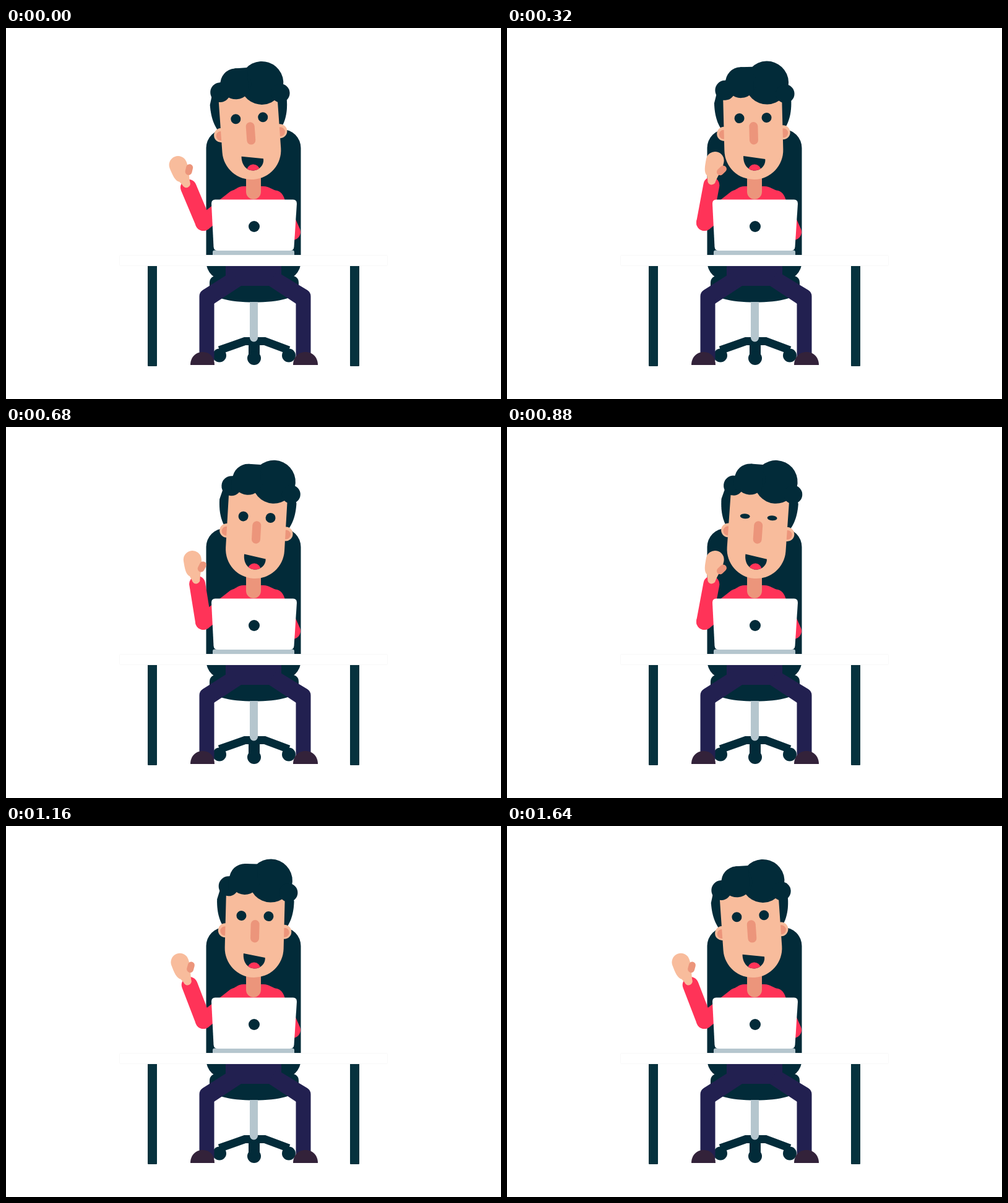
Animation, 800 px wide and 600 px high, one loop 1.68 s. Source, as an HTML page:

```html
<!DOCTYPE html>
<html lang="en">
<head>
<meta charset="utf-8">
<title>Waving at the desk</title>
<style>
  html, body { margin: 0; width: 100%; height: 100%; overflow: hidden; background: #fff; }
  svg { display: block; width: 100%; height: 100%; }
  .dark { fill: #022b39; }
  .leg { fill: #06323e; }
  .skin { fill: #f8bc9c; }
  .shade { fill: #ec957b; }
  .red { fill: #ff3358; }
  .grey { fill: #b5c6ce; }
  .shoe { fill: #33223a; }
  .limb { fill: none; stroke-linecap: round; stroke-linejoin: round; }
  .sleeve { stroke: #ff3358; stroke-width: 26; }
  .pants { stroke: #222050; stroke-width: 24; stroke-linecap: butt; }
</style>
</head>
<body>
<svg viewBox="0 0 800 600">
  <defs>
    <path id="mouth" d="M383 206.5L418 212.5C419 222 411 230.500 401 230.500C389 230.500 382 219 383 206.5Z"/>
    <clipPath id="mouthClip"><use href="#mouth"/></clipPath>
  </defs>

  <!-- chair -->
  <rect class="dark" x="323.500" y="164" width="153" height="244" rx="30"/>
  <path class="dark" d="M329 412Q329 400 345 400H457Q473 400 473 412V419C473 437 441 443.500 401 443.500S329 437 329 419Z"/>
  <path fill="none" stroke="#022b39" stroke-width="13" d="M345 521L386 506.500H418L457 521"/>
  <rect class="dark" x="392" y="503" width="18" height="31"/>
  <g class="dark">
    <circle cx="345" cy="529.500" r="11"/>
    <circle cx="401" cy="534" r="11"/>
    <circle cx="457" cy="529.500" r="11"/>
  </g>
  <path class="grey" d="M394 443H407V501a6.500 6.500 0 0 1-13 0Z"/>

  <!-- legs -->
  <path fill="#222050" d="M355 380H445V402L480 434 469 446 425 417H380L336 446 325 434 355 402Z"/>
  <path class="limb pants" d="M324.500 538V434L372 404M480.500 538V434L431 404"/>
  <path class="shoe" d="M298 545C298 533 306 524 318 524S337 533 337 545Z"/>
  <path class="shoe" d="M504 545C504 533 496 524 484 524S464 533 464 545Z"/>

  <!-- body -->
  <path class="red" d="M384 256H416C426 256 430 262 438 263C446 265 449 272 452 282V366H350V280L362 265C371 262 374 256 384 256Z"/>
  <path class="limb sleeve" d="M319 315L370 275M445 290L463 330"/>
  <path class="shade" d="M388 230H412V265a12 12 0 0 1-24 0Z"/>

  <g id="head">
    <path class="dark" d="M338 120C338 145 345 158 350 165H450C455 158 462.500 145 462.500 120L455 95H345Z"/>
    <g class="skin"><circle cx="352.500" cy="170" r="11.500"/><circle cx="448" cy="170" r="11.500"/></g>
    <g class="shade"><circle cx="352" cy="171" r="7.500"/><circle cx="448.500" cy="171" r="7.500"/></g>
    <path class="skin" d="M352.500 98H447.500V197.500a47.500 47.500 0 0 1-95 0Z"/>
    <g id="hair" class="dark">
      <circle cx="424" cy="88.500" r="35"/>
      <circle cx="382" cy="87" r="25"/>
      <circle cx="356" cy="99" r="16"/>
      <circle cx="453" cy="107" r="15"/>
      <path d="M356 84L382 62 402 62V106H356Z"/>
    </g>
    <g class="dark">
      <ellipse class="eye" cx="378" cy="145.500" rx="8" ry="8"/>
      <ellipse class="eye" cx="422" cy="145.500" rx="8" ry="8"/>
      <use href="#mouth"/>
    </g>
    <rect class="shade" x="393.500" y="152" width="14" height="36.500" rx="7"/>
    <circle class="red" cx="400.500" cy="231" r="10.500" clip-path="url(#mouthClip)"/>
  </g>

  <g id="forearm">
    <path class="limb sleeve" d="M0 0V-62"/>
    <path class="skin" d="M-16-102a14.500 14.500 0 0 1 29 0C13-90 8-80 5.500-69a6.500 6.500 0 0 1-13 0L-10-76C-16-80-16-90-16-102Z"/>
    <path class="limb" stroke="#ec957b" stroke-width="11" d="M14-91L10-85.500"/>
  </g>

  <!-- laptop and desk -->
  <rect class="grey" x="334" y="359.500" width="132" height="11" rx="3"/>
  <path fill="#fff" d="M338 277.500H464Q470 277.500 470 284L465.500 354Q465 360 459 360H342Q336 360 335.500 354L332 284Q332 277.500 338 277.500Z"/>
  <circle class="dark" cx="401" cy="321" r="9"/>
  <rect class="leg" x="229" y="383" width="15" height="164" rx="1"/>
  <rect class="leg" x="556" y="383" width="15" height="164" rx="1"/>
  <rect x="183.500" y="367.500" width="433" height="17" rx="2" fill="#fff" stroke="#f8f8f8"/>
</svg>
<script>
  const LOOP = 1680, WAVE = LOOP / 3, STEP = 40;
  const head = document.getElementById('head');
  const hair = document.getElementById('hair');
  const forearm = document.getElementById('forearm');
  const eyes = document.querySelectorAll('.eye');
  const swing = (t, period) => Math.cos(2 * Math.PI * t / period);

  function draw(now) {
    const t = Math.floor(now % LOOP / STEP) * STEP;
    const tilt = swing(t, LOOP);
    head.setAttribute('transform', `rotate(${-4 * tilt} 400 242)`);
    hair.setAttribute('transform', `translate(0 ${1.7 * tilt})`);
    forearm.setAttribute('transform', `translate(319 315) rotate(${-5.25 - 17.55 * swing(t, WAVE)})`);
    // one blink, halfway through the loop
    const open = Math.min(1, Math.max(0.1, Math.abs(t - LOOP / 2) / 80));
    eyes.forEach(eye => eye.setAttribute('ry', 8 * open));
  }

  const start = performance.now();
  function tick() {
    draw(performance.now() - start);
    requestAnimationFrame(tick);
  }
  tick();
</script>
</body>
</html>
```
